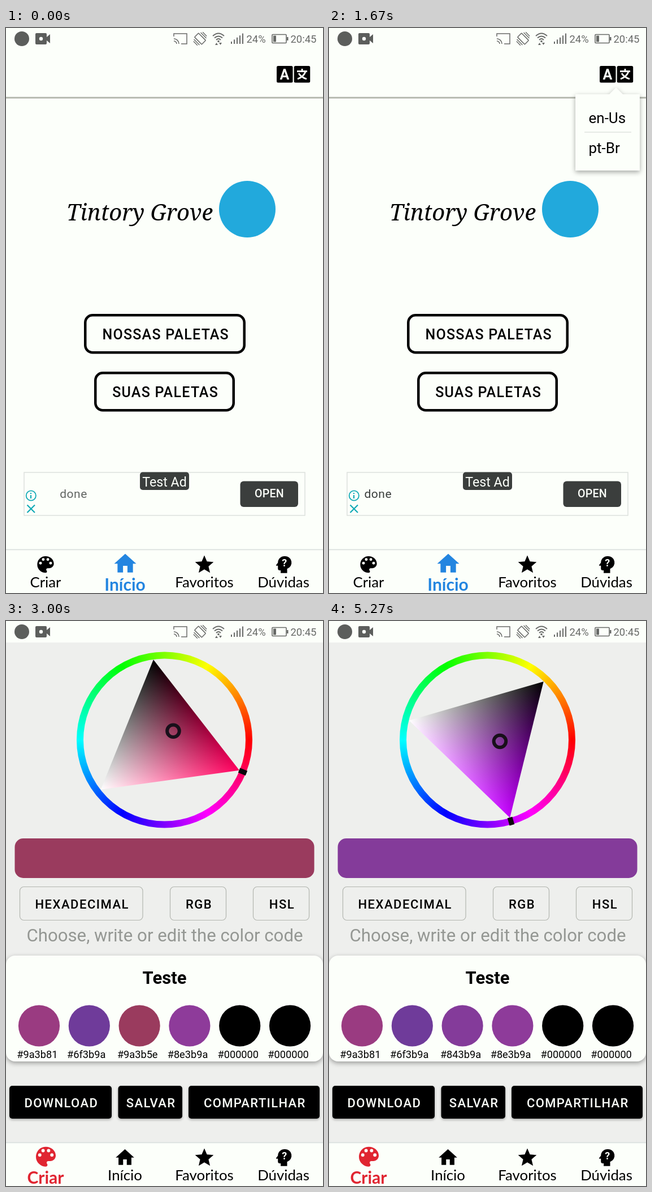
Write an HTML page with a canvas that moves like this. It is 561x998 px and loops after 5.43 s.

```html
<!DOCTYPE html>
<html lang="pt">
<head>
<meta charset="utf-8">
<title>Color palettes</title>
<style>
  html, body { margin: 0; width: 100%; height: 100%; overflow: hidden; background: #fcfffa; }
  svg, canvas { position: absolute; left: 0; top: 0; display: block; }
  text { font-family: Roboto, sans-serif; white-space: pre; }
  .caps { font-weight: 500; }
  .nav { font-family: Lato, sans-serif; }
  .name { font-family: "Noto Serif", serif; font-style: italic; }
  .soft { filter: drop-shadow(0 3px 4px rgba(0, 0, 0, .35)); }
</style>
</head>
<body>
<svg id="stage" width="561" height="998" viewBox="0 0 561 998"></svg>
<canvas id="wheel" width="561" height="376"></canvas>
<script>
const LOOP = 5430, PAPER = '#fcfffa', GREY = '#686a68', DARK = '#3b3e3d';
const $ = id => document.getElementById(id);

// ---- markup helpers ----
const rect = (x, y, w, h, r, fill, more = '') =>
  `<rect x="${x}" y="${y}" width="${w}" height="${h}" rx="${r}" fill="${fill}" ${more}/>`;
const dot = (x, y, r, fill, more = '') =>
  `<circle cx="${x}" cy="${y}" r="${r}" fill="${fill}" ${more}/>`;
const line = (d, color, w, more = '') =>
  `<path d="${d}" fill="none" stroke="${color}" stroke-width="${w}" ${more}/>`;
const text = (s, x, y, size, fill = '#000', more = '') =>
  `<text x="${x}" y="${y}" font-size="${size}" fill="${fill}" ${more}>${s}</text>`;
const caps = (s, x, y, size, spacing, fill = '#000') =>
  text(s, x + spacing, y, size, fill, `class="caps" text-anchor="middle" letter-spacing="${spacing}"`);

// ---- status bar ----
function statusBar() {
  const bars = [0, 1, 2, 3, 4].map(i =>
    rect(398 + i * 5, 24 - i * 3.6, 2, 4 + i * 3.6, 0, GREY)).join('');
  return rect(0, 0, 561, 38, 0, PAPER)
    + dot(28, 19, 13, '#5c5e5c')
    + `<path d="M54 9h16q2 0 2 2v5l6-5v16l-6-5v5q0 2-2 2h-16q-2 0-2-2v-16q0-2 2-2z" fill="#5c5e5c"/>`
    + dot(62, 19, 3.2, PAPER)
    + line('M297 15v-5h23v18h-10M297 19a9 9 0 0 1 9 9M297 23a5 5 0 0 1 5 5', GREY, 1.5)
    + `<g transform="rotate(-45 343.500 19)">`
    + rect(338.5, 10, 10, 18, 1, 'none', `stroke="${GREY}" stroke-width="1.6"`)
    + line('M335 12v14M352 12v14M332 14v10M355 14v10', GREY, 1.4) + '</g>'
    + line('M366 14q10-9 20 0M369 17.500q7-6 14 0M372 21q4-4 8 0', GREY, 1.8)
    + dot(376, 23.5, 1.8, GREY)
    + `<path d="M370 30l2.500-4 2.500 4zM377 26h5l-2.500 4z" fill="${GREY}"/>`
    + bars
    + text('24%', 425.5, 26, 18.4, GREY)
    + rect(471, 11.5, 25, 15, 1, 'none', `stroke="${GREY}" stroke-width="1.6"`)
    + rect(473, 13.5, 5, 11, 0, GREY) + rect(497, 16, 2.5, 6, 0, GREY)
    + text('20:45', 503.5, 26, 18.4, GREY);
}

// ---- bottom tabs, icons on a 24 unit grid ----
const holes = [[6.5, 10.5], [9.5, 6.5], [14.5, 6.5], [17.5, 10.5]];
const icons = {
  palette: '<path d="M12 3a9 9 0 0 0 0 18c.83 0 1.5-.67 1.5-1.5 0-.39-.15-.74-.39-1.010-.23-.26-.38-.61-.38-.99 0-.83.67-1.5 1.5-1.5H16c2.760 0 5-2.240 5-5 0-4.420-4.030-8-9-8z"/>'
    + holes.map(([x, y]) => dot(x, y, 1.5, PAPER)).join(''),
  home: '<path d="M10 20v-6h4v6h5v-8h3L12 3 2 12h3v8z"/>',
  star: '<path d="M12 17.270L18.180 21l-1.640-7.030L22 9.240l-7.190-.61L12 2 9.190 8.630 2 9.240l5.460 4.730L5.820 21z"/>',
  head: '<path d="M13 3a7 7 0 0 0-7 7l-1.900 2.500q-.5.8.4.8H6v3a2 2 0 0 0 2 2h1v3h7v-4.700A7 7 0 0 0 13 3z"/>'
    + text('?', 13.1, 14.2, 11, PAPER, 'font-weight="700" text-anchor="middle"')
};
const tabs = [
  ['Criar', 'palette', 70, '#e02531'], ['Início', 'home', 210.5, '#2385e0'],
  ['Favoritos', 'star', 351, '#000'], ['Dúvidas', 'head', 491, '#000']
];
function tabBar(active) {
  return rect(0, 921, 561, 77, 0, PAPER) + rect(0, 920.5, 561, 1.8, 0, '#dbe1df')
    + tabs.map(([label, icon, x, tint], i) => {
      const on = i === active, fill = on ? tint : '#000', k = on ? 1.95 : 1.63;
      return `<g fill="${fill}" transform="translate(${x + on * .5} ${on ? 946.2 : 947.7}) scale(${k}) translate(-12 -12)">${icons[icon]}</g>`
        + text(label, x, on ? 994 : 988, on ? 30 : 25.8, fill,
          `class="nav" text-anchor="middle" font-weight="${on ? 700 : 400}"`);
    }).join('');
}

// ---- home screen ----
function outlineButton(label, x, y, w) {
  return rect(x + 2.25, y + 2.25, w - 4.5, 66, 13, 'none', 'stroke="#000" stroke-width="4.500"')
    + caps(label, x + w / 2 + .4, y + 45, 25, 1.25);
}
function homeScreen() {
  return rect(0, 38, 561, 960, 0, PAPER)
    + rect(0, 121.7, 561, 2.8, 0, '#b3b6ac')
    + rect(479, 56, 59, 49.5, 0, '#dcdedb', 'id="press"')
    + rect(479, 67, 28.5, 29.5, 2.5, '#000') + rect(509.7, 67, 28.5, 29.5, 2.5, '#000')
    + text('A', 493, 90.5, 25, PAPER, 'font-weight="700" text-anchor="middle"')
    + line('M515 76.500h18M524 72v4.500M530 77q-3 9-14 13M518 80q4 7 14 10', PAPER, 2.8)
    + dot(427, 320, 50, '#22a9dc')
    + text('Tintory Grove', 107, 340, 40, '#000', 'class="name"')
    + outlineButton('NOSSAS PALETAS', 138, 505, 286)
    + outlineButton('SUAS PALETAS', 156, 607, 249)
    + rect(32, 785, 497, 76, 0, 'none', 'stroke="#dde1dd" stroke-width="1.500"')
    + text('done', 63, 830, 21, DARK, 'id="done" letter-spacing=".5"')
    + rect(237, 784.5, 87, 31.5, 5, DARK)
    + text('Test Ad', 280.5, 809.5, 23.2, PAPER, 'text-anchor="middle"')
    + rect(414.5, 800.5, 102.5, 45.5, 6, DARK)
    + caps('OPEN', 465.8, 829, 19.6, .2, PAPER)
    + line('M44 821v2M44 825v6M37.500 842.500l13.500 13.500M51 842.500l-13.500 13.500', '#12aab6', 2.2)
    + dot(44.3, 826, 8.6, 'none', 'stroke="#12aab6" stroke-width="1.800"')
    + tabBar(1)
    + '<g id="menu"><path class="soft" d="M436 117h60l12-12 12 12h30v135h-114z" fill="#fcfffa"/>'
    + text('en-Us', 459.5, 168, 26) + rect(452, 183.5, 83, 1.2, 0, '#d9dcd9')
    + text('pt-Br', 459.5, 221, 26) + '</g>';
}

// ---- create screen ----
const swatches = ['#9a3b81', '#6f3b9a', '#9a3b5e', '#8e3b9a', '#000000', '#000000'];
const STEP = 88.8;
function createScreen() {
  const modes = [['HEXADECIMAL', 24.5, 217.5], ['RGB', 290.5, 99], ['HSL', 437.5, 99]];
  const actions = [['DOWNLOAD', 6, 181], ['SALVAR', 198.5, 113.5], ['COMPARTILHAR', 323, 232]];
  return rect(0, 38, 561, 960, 0, '#eeefed')
    + rect(15.5, 384, 530, 70, 15, swatches[2], 'id="bar"')
    + modes.map(([s, x, w]) =>
      rect(x, 469.5, w, 59, 7, 'none', 'stroke="#b3b6b0" stroke-width="1.200"')
      + caps(s, x + w / 2, 508, 22, 1.5)).join('')
    + text('Choose, write or edit the color code', 281, 566, 31.2, '#949793', 'text-anchor="middle"')
    + rect(0, 591, 561, 187, 16, PAPER, 'class="soft"')
    + text('Teste', 280.5, 640.5, 31, '#000', 'font-weight="700" text-anchor="middle"')
    + rect(319.7, 607, 3, 43, 0, '#138a7c', 'id="caret"')
    + swatches.map((c, i) =>
      dot(58.5 + STEP * i, 715, 36.6, c, `id="chip${i}"`)
      + text(c, 19.3 + STEP * i, 772, 18.2, '#000', `id="code${i}"`)).join('')
    + actions.map(([s, x, w]) =>
      rect(x, 821, w, 58, 5, '#000', 'style="filter:drop-shadow(0 2px 2px rgba(0,0,0,.3))"')
      + caps(s, x + w / 2, 858.5, 22, 1.35, PAPER)).join('')
    + tabBar(0);
}

$('stage').innerHTML = `<g id="home">${homeScreen()}</g><g id="create">${createScreen()}</g>${statusBar()}`;

// ---- colour wheel ----
const CX = 280.5, CY = 210, LOW = 59, HIGH = 154;
const ctx = $('wheel').getContext('2d');
const clamp = v => Math.min(1, Math.max(0, v));
const pure = h => {
  const k = h / 60;
  return [Math.abs(k - 3) - 1, 2 - Math.abs(k - 2), 2 - Math.abs(k - 4)].map(clamp);
};
const toHex = h => '#' + pure(h)
  .map(v => Math.round(LOW + (HIGH - LOW) * v).toString(16).padStart(2, '0')).join('');
const polar = (deg, r) => {
  const a = deg * Math.PI / 180;
  return [CX + r * Math.cos(a), CY - r * Math.sin(a)];
};

const ring = ctx.createConicGradient(0, CX, CY);
for (let i = 0; i <= 6; i++) ring.addColorStop(i / 6, `hsl(${360 - 60 * i} 100% 50%)`);

function drawWheel(hue) {
  ctx.clearRect(0, 0, 561, 376);

  // Add the hue corner to the white corner, then cut out the triangle
  const corners = [0, 120, 240].map(d => polar(hue + d, 143));
  const glow = (i, color) => {
    const g = ctx.createLinearGradient(...corners[i], ...polar(hue + 120 * i + 180, 71.5));
    g.addColorStop(0, color);
    g.addColorStop(1, '#000');
    return g;
  };
  ctx.globalCompositeOperation = 'lighter';
  for (const fill of [glow(0, `hsl(${hue} 100% 50%)`), glow(2, '#fff')]) {
    ctx.fillStyle = fill;
    ctx.fillRect(0, 0, 561, 376);
  }
  ctx.globalCompositeOperation = 'destination-in';
  ctx.beginPath();
  corners.forEach(p => ctx.lineTo(...p));
  ctx.closePath();
  ctx.fillStyle = '#000';
  ctx.fill();
  ctx.globalCompositeOperation = 'source-over';

  ctx.beginPath();
  ctx.arc(CX, CY, 149.5, 0, 7);
  ctx.strokeStyle = ring;
  ctx.lineWidth = 12;
  ctx.stroke();

  const weights = [(HIGH - LOW) / 255, 1 - HIGH / 255, LOW / 255];
  const pick = [0, 1].map(a => corners.reduce((sum, p, i) => sum + p[a] * weights[i], 0));
  ctx.beginPath();
  ctx.arc(...pick, 10.8, 0, 7);
  ctx.strokeStyle = '#18101a';
  ctx.lineWidth = 6;
  ctx.stroke();

  ctx.save();
  ctx.translate(CX, CY);
  ctx.rotate(-hue * Math.PI / 180);
  ctx.fillStyle = '#0c080c';
  ctx.fillRect(142.5, -4.5, 14, 9);
  ctx.restore();
}

// ---- timeline ----
const span = (t, a, b) => clamp((t - a) / (b - a));
const easeOut = p => 1 - (1 - p) ** 3;
const between = (t, a, b) => t >= a && t < b;
const show = (id, on) => $(id).style.display = on ? '' : 'none';

function render(t) {
  const creating = t >= 3000;
  show('home', !creating);
  show('create', creating);
  show('wheel', creating);

  if (!creating) {
    const slide = easeOut(span(t, 0, 420));
    $('done').setAttribute('x', 95.5 - 33 * slide);
    $('done').setAttribute('opacity', .8 + .2 * slide);
    $('press').setAttribute('opacity', span(t, 1150, 1230) * (1 - span(t, 1450, 1560)));
    const open = easeOut(span(t, 1400, 1700)) * (1 - span(t, 2500, 2800) ** 2);
    show('menu', open > .01);
    $('menu').setAttribute('opacity', open);
    $('menu').setAttribute('transform', `translate(508 105) scale(${open}) translate(-508 -105)`);
    return;
  }
  show('caret', between(t, 4000, 4530));
  const hue = 337.9 - 51.8 * Math.sin(span(t, 4560, 5270) * Math.PI / 2);
  const color = toHex(hue);
  $('bar').setAttribute('fill', color);
  $('chip2').setAttribute('fill', color);
  $('code2').textContent = color;
  drawWheel(hue);
}

const start = performance.now();
function tick() {
  render((performance.now() - start) % LOOP);
  requestAnimationFrame(tick);
}
tick();
</script>
</body>
</html>
```
